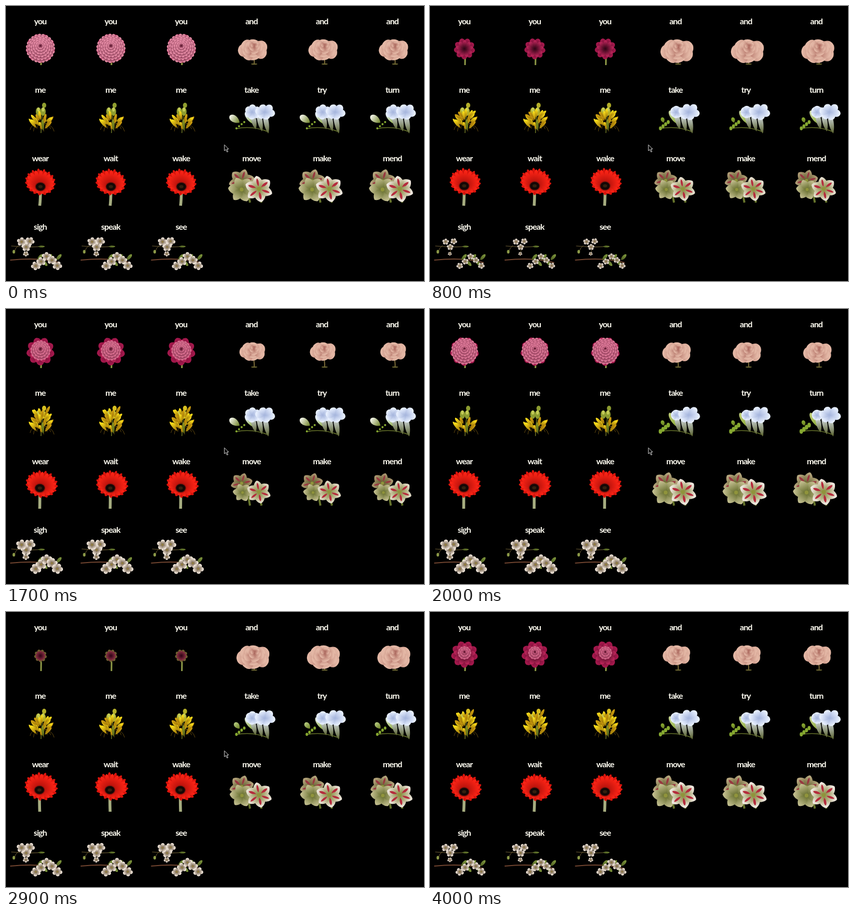
These frames come from a looping animation (800x526 px, 4900 ms). An HTML page with a canvas:

```html
<!DOCTYPE html>
<html lang="en">
<head>
<meta charset="utf-8">
<title>Flower words</title>
<style>
html, body { margin: 0; height: 100%; overflow: hidden; background: #000; }
canvas { display: block; }
</style>
</head>
<body>
<canvas id="stage" width="800" height="526"></canvas>
<script>
const ctx = document.getElementById('stage').getContext('2d');
const LOOP = 4900, STEP = 100, LAST = 40, PITCH = 134.8;
const WORDS = [
  'you you you and and and',
  'me me me take try turn',
  'wear wait wake move make mend',
  'sigh speak see'
].map(row => row.split(' '));

const clamp = v => Math.min(1, Math.max(0, v));
const lerp = (a, b, k) => a + (b - a) * k;
// Wraps t into [start, start + period).
const phase = (t, period, start) => ((t - start) % period + period) % period + start;

function mix(a, b, k) {
  const channel = (c, i) => parseInt(c.slice(i, i + 2), 16);
  return `rgb(${[1, 3, 5].map(i => Math.round(lerp(channel(a, i), channel(b, i), k)))})`;
}

// A leaf shape from a base to a tip, shaded along its length.
function petal(x, y, tx, ty, w, inner, outer, blunt = 0.6) {
  const len = Math.hypot(tx - x, ty - y);
  const shade = ctx.createLinearGradient(0, 0, len, 0);
  shade.addColorStop(0, inner);
  shade.addColorStop(0.9, outer);
  ctx.save();
  ctx.translate(x, y);
  ctx.rotate(Math.atan2(ty - y, tx - x));
  ctx.beginPath();
  ctx.moveTo(0, 0);
  ctx.bezierCurveTo(len * 0.35, -w, len * 0.95, -w * blunt, len, 0);
  ctx.bezierCurveTo(len * 0.95, w * blunt, len * 0.35, w, 0, 0);
  ctx.fillStyle = shade;
  ctx.fill();
  ctx.restore();
}

// Petals around a hub; the ellipse of their tips may sit off the hub by dx, dy.
function ring(x, y, rx, ry, count, w, inner, outer, options = {}) {
  const { turn = 0, from = 0, dx = 0, dy = 0, ragged = 0, blunt = 0.9, stripe } = options;
  for (let i = 0; i < count; i++) {
    const a = turn + i * 2 * Math.PI / count, reach = 1 - ragged * (1 + Math.sin(i * 7)) / 2;
    const vx = dx + Math.cos(a) * rx * reach, vy = dy + Math.sin(a) * ry * reach;
    petal(x + vx * from, y + vy * from, x + vx, y + vy, w, inner, outer, blunt);
    if (stripe) petal(x + vx * 0.2, y + vy * 0.2, x + vx * 0.8, y + vy * 0.8, w * 0.2, stripe, stripe);
  }
}

function oval(x, y, rx, ry, fill) {
  ctx.beginPath();
  ctx.ellipse(x, y, rx, ry, 0, 0, 7);
  ctx.fillStyle = fill;
  ctx.fill();
}

// A stem bending towards its control point.
function stem(color, width, x, y, cx, cy, tx, ty) {
  ctx.beginPath();
  ctx.moveTo(x, y);
  ctx.quadraticCurveTo(cx, cy, tx, ty);
  ctx.strokeStyle = color;
  ctx.lineWidth = width;
  ctx.stroke();
}

function dahlia(t) {
  const p = phase(t, 26, 2), grown = (p - 2) / 24;
  const r = 28 - 18 * (1 - grown) ** 3, full = clamp((p - 7) / 14), green = clamp((8 - p) / 5);
  const x = 66, y = lerp(84, 81, clamp(grown * 3));
  stem('#8f9a48', 3, x, y, 68, 98, 67, 113);
  ring(x, y, r, r, 9, r * 0.42, '#3c061c', mix('#a4184c', '#66742c', green * 0.8), { turn: 0.2 });
  ring(x, y, r * 0.8, r * 0.8, 9, r * 0.28, '#2c0414', mix('#b82458', '#8c2c44', green), { turn: 0.55 });
  for (let d = full * r, k = 0; d > 2; d -= 4.4, k++) {
    ring(x, y - (r - d) * 0.22, d, d, Math.round(d * 0.72) + 3, 4.4, '#4c0820', mix('#cc4474', '#f094ae', grown),
      { turn: k * 0.5, from: Math.max(0, 1 - 9 / d), blunt: 1.1 });
  }
}

function rose(t) {
  const open = clamp((phase(t, 21, 10) - 11) / 14);
  const x = lerp(470, 472, open), y = lerp(78, 87, open), rx = lerp(22, 36, open), ry = lerp(15, 24, open);
  stem('#7a6a38', 2, x, y, 476, 100, 475, 112);
  oval(475, 111, 6, 1.3, '#6a6430');
  for (let k = 0; k < 5; k++) {
    const size = 1 - k * 0.18;
    ring(x + k, y - k * ry * 0.12, rx * size, ry * size, 7 - k, rx * size * 0.5, '#a8645a', '#e4b8a6',
      { turn: 0.4 + k * 1.1, ragged: 0.15, blunt: 1 });
  }
}

function honeysuckle(t) {
  const open = clamp((phase(t, 21, -1) + 1) / 17), count = 26;
  stem('#6c7424', 1.5, 67, 243, 68, 215, 73, 190);
  for (let i = 0; i < 8; i++) stem('#7a5c14', 0.8, 68, 222, 47 + i * 6, 226, 46 + i * 6.6, 237 + 3 * Math.sin(i * 2));
  const bud = mix('#8c9c30', '#d8c020', open);
  oval(73, 190, 4, 5, bud);
  for (const x of [62, 71]) {
    oval(x, 202, 5, 8, bud);
    oval(x, 198, 2.5, 4, '#c4cc58');
  }
  for (let i = 0; i < count * (0.5 + open * 0.5); i++) {
    const h = i / count, dx = 25 * (1 - h * 0.3) * Math.sin(i * 2.4), y = 229 - h * 35;
    petal(68 + dx * 0.4, y + 7, 68 + dx, y - 6 + 5 * Math.cos(i * 1.7), 4.5, '#a07808', i % 3 ? '#fce01c' : '#d0a010');
  }
  petal(70, 216, 71, 238, 4, '#8c9a24', '#5c6a18');
}

function freesia(t) {
  const open = (phase(t, 17, 1) - 1) / 16, pod = clamp(open * 2.2 - 1.1);
  const green = '#86a830', white = '#e8f0ff', shade = '#a4b4dc';
  stem('#65722a', 1.5, 440, 235, 470, 228, 503, 241);
  for (let i = 0; i < 4; i++) {
    oval(441 + i * 5, 234 - i * 4, lerp(3.5, 2, open), lerp(5, 2, open), green);
  }
  petal(447, 223, lerp(444, 428, pod), lerp(213, 210, pod), lerp(5, 9, pod), '#6c8024', mix(green, '#eceee0', pod), 0.9);
  petal(474, 226, 458, lerp(198, 203, open), 7, green, mix('#b8c860', white, open), 0.9);
  for (let i = 0; i < 3; i++) petal(478 + i * 12, 236 + i * 4, 470 + i * 12, 200, 8, '#58602c', white);
  const left = lerp(0.65, 1, open), right = lerp(1, 0.9, open);
  ring(471, 203, 18 * left, 17 * left, 6, 9, shade, white, { turn: 0.6, ragged: 0.2 });
  ring(495, 203, 25 * right, 19 * right, 6, 10, shade, white, { turn: 0.2, ragged: 0.2 });
}

function gerbera(t) {
  const p = phase(t, 30, 0), k = p / 29;
  const x = lerp(66, 64, k), y = lerp(345.5, 340.5, k);
  const tips = { dx: 67.5 + 2.5 * Math.sin((p - 8) * 0.3) - x, dy: lerp(336.5, 333.5, k) - y, ragged: 0.12 };
  stem('#a6ad80', 5.5, x, 352, x, 370, 64.5, 382);
  for (const [size, color] of [[1, '#dc140c'], [0.9, '#fc2416']]) {
    ring(x, y, lerp(33, 36, k) * size, lerp(26, 27.5, k) * size, 17, 5.5, '#a00c08', color, { ...tips, turn: size * 2 });
  }
  oval(x, y, 10.5, 9, '#84140c');
  oval(x, y, 9, 7.5, '#140806');
  oval(x, y, 4, 3, '#34200f');
}

function amaryllis(t) {
  const open = clamp((phase(t, 10, 3) - 3) / 7), red = '#b42c3c';
  const lily = (x, y, r, inner, outer, turn, stripe) => {
    ring(x, y, r, r * 0.94, 3, r * 0.75, inner, outer, { turn: turn + Math.PI / 3, blunt: 0.3, stripe });
    ring(x, y, r, r * 0.94, 3, r * 0.65, inner, outer, { turn, blunt: 0.3, stripe });
    oval(x, y, r * 0.14, r * 0.14, '#90943c');
  };
  for (const x of [464, 486]) stem('#66742c', 4, x, 350, x, 362, x + 3, 376);
  lily(451, lerp(331, 335, open), lerp(16, 25, open), '#605c2c', mix('#947c58', '#b8a880', open), 0.8, '#983840');
  lily(lerp(455, 451, open), 351, lerp(9, 26, open), '#646c2c', '#c0bc8c', 0.1);
  lily(484, 350, lerp(19, 27, open), '#84883c', mix('#ccc8a4', '#f0e8e0', open), 0.35, red);
}

function cherry(t) {
  const open = clamp((phase(t, 14, 8) - 9) / 8), twig = '#6c5c34';
  stem('#70442f', 2, 8, 486, 65, 480, 103, 491);
  stem(twig, 1.2, 10, 459, 40, 462, 74, 460);
  stem(twig, 1, 42, 456, 40, 465, 38, 474);
  stem(twig, 1, 24, 458, 18, 462, 16, 470);
  oval(15, 470, 2.5, 3.5, '#8c9a48');
  petal(61, 460, 74, 460, 3, '#4c5c20', '#6c8030');
  for (let i = 0; i < 5; i++) {
    const x = 60 + i * 9, side = i % 2 ? 1 : -1;
    petal(x, 486, x + 10, 486 + side * 11, 5, '#4c5c20', '#7c943c');
  }
  const blossom = (x, y, size) => {
    const r = size * lerp(0.65, 1.1, open);
    ring(x, y, r, r * 0.9, 5, r * 0.5, '#6c5840', '#f4eae0', { turn: x, blunt: 1 });
    oval(x, y, r * 0.17, r * 0.17, '#94803c');
  };
  blossom(38, 474, 6);
  for (let i = 0; i < 3; i++) blossom(38 + 9 * Math.cos(i * 2.1 - 0.6), 454 + 7 * Math.sin(i * 2.1 - 0.6), 10);
  for (let i = 0; i < 5; i++) blossom(57 + i * 10.3, 488 + 9 * Math.cos(i * 1.5), 10);
}

function cursor() {
  const arrow = new Path2D('M418 265.5v11.5l2.7-2.5 2.3 4.8 1.8-.9-2-4.6 3.2-.3z');
  ctx.fillStyle = '#000';
  ctx.fill(arrow);
  ctx.strokeStyle = '#ddd';
  ctx.lineWidth = 1;
  ctx.stroke(arrow);
}

const FLOWERS = [dahlia, rose, honeysuckle, freesia, gerbera, amaryllis, cherry];

function drawWords() {
  ctx.font = '700 16px Lato, "Open Sans", sans-serif';
  ctx.letterSpacing = '-0.9px';
  ctx.textAlign = 'center';
  ctx.fillStyle = '#fffdf2';
  WORDS.forEach((row, r) => row.forEach((word, c) => ctx.fillText(word, 65.5 + c * PITCH, 34.5 + r * 131)));
}

function frame(now) {
  const tick = Math.min(LAST, Math.floor(now % LOOP / STEP));
  ctx.fillStyle = '#000';
  ctx.fillRect(0, 0, 800, 526);
  for (const flower of FLOWERS) {
    for (let i = 0; i < 3; i++) {
      ctx.save();
      ctx.translate(i * PITCH, 0);
      flower(tick);
      ctx.restore();
    }
  }
  drawWords();
  if (tick < LAST - 1) cursor();
}

const start = performance.now();
function run() {
  frame(performance.now() - start);
  requestAnimationFrame(run);
}
run();
</script>
</body>
</html>
```
